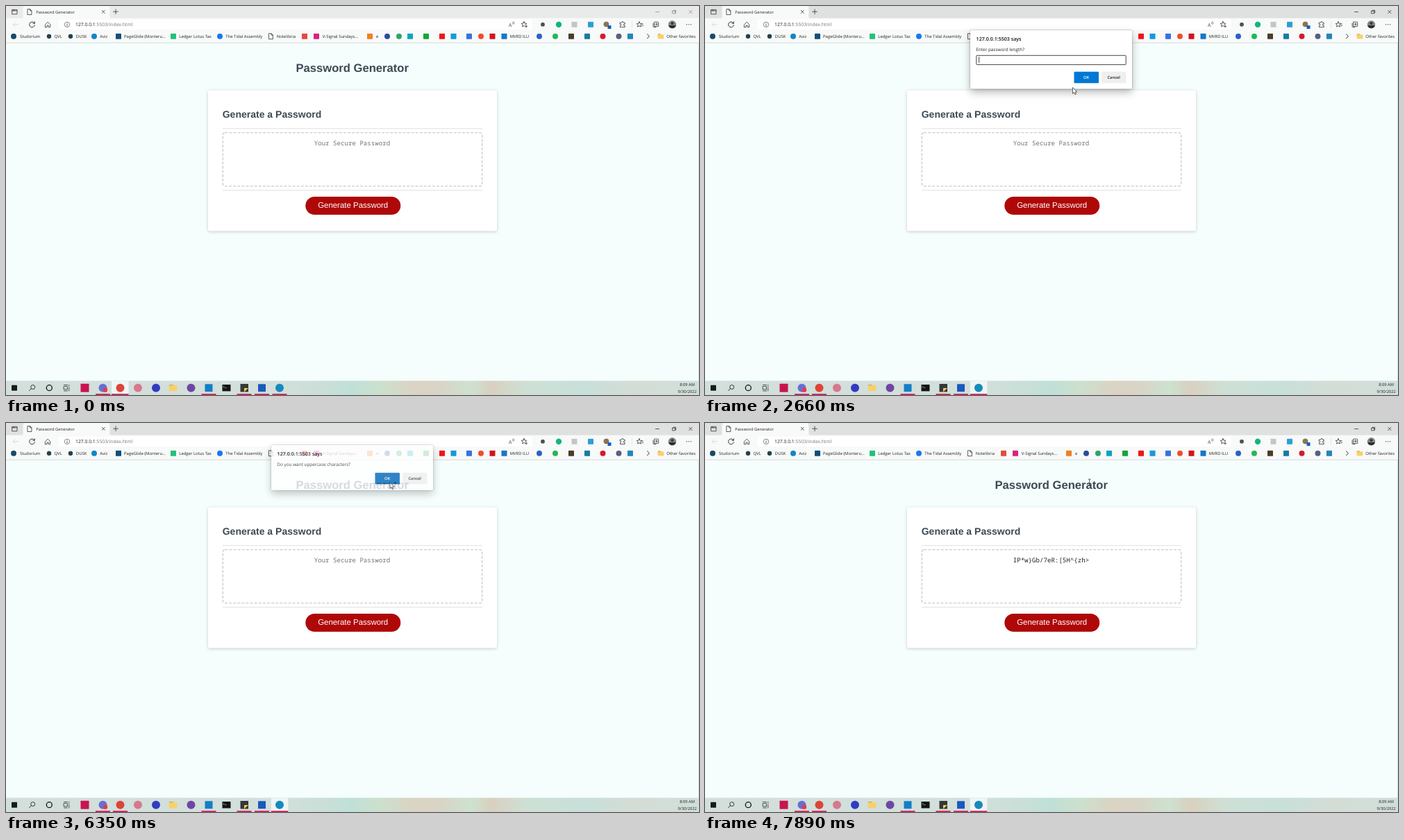
Write an HTML page that moves like this. It is 998 by 561 pixels and loops after 8 s.

```html
<!DOCTYPE html>
<html lang="en">
<head>
<meta charset="utf-8">
<title>Password Generator</title>
<style>
html, body { margin: 0; width: 100%; height: 100%; overflow: hidden; }
svg { display: block; width: 998px; height: 561px; }
text { font-family: "Open Sans", "Noto Sans", sans-serif; text-rendering: geometricPrecision; white-space: pre; }
.page { font-family: "Liberation Sans", Arial, sans-serif; }
.mono { font-family: "Noto Sans Mono", "DejaVu Sans Mono", monospace; }
.line { fill: none; stroke: #333; stroke-width: .8; stroke-linecap: round; stroke-linejoin: round; }
.card { filter: drop-shadow(0 1px 2px rgba(0,0,0,.2)); }
.panel { filter: drop-shadow(0 0 1px rgba(0,0,0,.35)) drop-shadow(0 5px 6px rgba(0,0,0,.27)); }
</style>
</head>
<body>
<svg id="stage" viewBox="0 0 998 561" xmlns="http://www.w3.org/2000/svg"></svg>
<script>
const LOOP = 8000;
const INK = '#3b4a54', BLUE = '#0078d4', DARK_BLUE = '#0067b8';
const stage = document.getElementById('stage');

// Markup helpers
const rect = (x, y, w, h, fill, r = 0, more = '') =>
  `<rect x="${x}" y="${y}" width="${w}" height="${h}" rx="${r}" fill="${fill}" ${more}/>`;
const disc = (x, y, r, fill, more = '') => `<circle cx="${x}" cy="${y}" r="${r}" fill="${fill}" ${more}/>`;
const box = (x, y, s, fill) => rect(x - s / 2, y - s / 2, s, s, fill, .6);
const line = (d, more = '') => `<path class="line" d="${d}" ${more}/>`;
const text = (x, y, size, str, more = '', fill = '#222') =>
  `<text x="${x}" y="${y}" font-size="${size}" fill="${fill}" ${more}>${str}</text>`;
const mid = 'text-anchor="middle"';
const sheet = (x, y) => line(`M${x - 2.7} ${y - 4}h3.4l2.2 2.2v5.8h-5.6zM${x + .6} ${y - 4}v2.3h2.3`);
const folder = (x, y, w, h) =>
  rect(x - w / 2, y - h / 2, w * .5, h * .6, '#d99e1f', .7) +
  rect(x - w / 2, y - h / 2 + 1, w, h - 1, '#f9d066', .7);
const star = (x, y) => {
  let d = '';
  for (let i = 0; i < 10; i++) {
    const a = i * Math.PI / 5 - Math.PI / 2, r = i % 2 ? 1.9 : 4.1;
    d += `${i ? 'L' : 'M'}${(x + r * Math.cos(a)).toFixed(2)} ${(y + r * Math.sin(a)).toFixed(2)}`;
  }
  return line(d + 'z');
};

function tabStrip() {
  return rect(0, 0, 998, 18, '#e9ebeb', 0, 'id="strip"') +
    `<path d="M23 18q1.5 0 1.5-2V2q0-2 2-2h121q2 0 2 2v14q0 2 1.5 2z" fill="#f8f9f9"/>` +
    line('M9 5.3h7v6.4h-7zM9 6.9h7M11 5.3v1.6', 'stroke-width="1"') +
    sheet(34, 8.5) + text(43.3, 10.6, 5.85, 'Password Generator') +
    line('M138.3 6.3l4 4m0-4l-4 4M158 4.8v6.8M154.6 8.2h6.8') +
    `<g id="controls">${line('M935.5 8.5h5M960 7.2h3.6v3.6h-3.6zM961 7.2v-1h3.7v3.7h-1M983.7 6.2l4.4 4.4m0-4.4l-4.4 4.4')}</g>`;
}

function toolbar() {
  return rect(0, 17.5, 998, 36, '#f8f9f9') + rect(76, 19.5, 682, 14.5, '#fff', 2.5) +
    line('M17.5 26.7h-7.5m3.2-3.2l-3.2 3.2 3.2 3.2', 'style="stroke:#d2d4d4"') +
    line('M41 24.9a3.9 3.9 0 1 0 .4 2.7M41.3 22.7v2.4h-2.4', 'style="stroke-width:1"') +
    line('M56.7 26.5l3.5-3.3 3.5 3.3v4.1h-2.4v-2.6h-2.2v2.6h-2.4z') +
    disc(88, 26.8, 3.7, 'none', 'stroke="#555" stroke-width=".7"') + line('M88 26.5v2.2M88 24.9v.1') +
    text(100, 29.2, 6.8, '127.0.0.1<tspan fill="#777">:5503/index.html</tspan>') +
    text(724, 29.7, 7, 'A', '', '#444') + line('M729.5 23.4q1.2 1 0 2.2M731 22.5q2 2 0 4', 'style="stroke-width:.6"') +
    star(746, 26.5) + disc(749, 29.3, 2.4, '#fff') + line('M747.3 29.3h3.4M749 27.6v3.4') +
    disc(773, 26.7, 2.9, '#4b5058') + disc(796, 26.7, 4.2, '#13b57d') +
    box(818.5, 26.7, 8, '#c4c5c6') + box(842, 26.7, 8, '#2b9fd2') +
    disc(864.5, 26.3, 3.9, '#8b7354') + box(869, 30.5, 5, '#1260c4') +
    line('M884.5 24h2.2q.3-2 1.5-1.6t1 1.6h2v2.2q-2-.2-2 1t2 1v2.2h-6.7v-2.2q1.6 0 1.6-1.1t-1.6-1z') +
    line('M901.5 22v9', 'style="stroke:#ddd"') +
    star(912, 26.7) + line('M915.5 26h2M916 28.5h1.5') +
    line('M932 25v4.5q0 1 1 1h3M934 23h4.7q1 0 1 1v5.3h-5.7zM936.8 24.6v3.2M935.2 26.2h3.2') +
    disc(959.5, 26.7, 5.7, '#85847e') + `<path d="M954.2 28a5.5 5.5 0 0 0 10.6 0z" fill="#292d2d"/>` +
    disc(959.5, 25, 2, '#373634') +
    [980.5, 983.5, 986.5].map(x => disc(x, 26.7, .65, '#333')).join('');
}

function bookmarks() {
  const labels = [[20, 'Studorium'], [69.5, 'QVL'], [100.8, 'DUSK'], [135.3, 'Aviz'],
    [170, 'PageGlide (Monteru...'], [249.3, 'Ledger Lotus Tax'], [316.3, 'The Tidal Assembly'],
    [389.7, 'Notelibria'], [455.7, 'V-Signal Sundays...'], [533, 'e'], [725.7, 'MVRD ILU'],
    [951.3, 'Other favorites']];
  const round = [[11, '#174a67'], [62, '#24404d'], [93, '#24404d'], [127, '#1385c5'], [308, '#1877f2'],
    [549, '#294c9c'], [566, '#2ba56b'], [684, '#ee4d2d'], [768, '#2862c7'], [791, '#20b957'],
    [859.5, '#d7192d'], [882.5, '#576080']];
  const square = [[162, '#124e7b'], [241, '#22c17c'], [430, '#e24a3d'], [447, '#d8237b'], [524, '#ef8020'],
    [582, '#08a5c2'], [605, '#12a737'], [628, '#ef1515'], [644.5, '#139bd7'], [667, '#3572df'],
    [700.5, '#d3121d'], [717.5, '#1478c9'], [814, '#4b3c25'], [837, '#147da0'], [899, '#2087b8']];
  return round.map(([x, c]) => disc(x, 43.7, x === 62 || x === 93 ? 3.2 : 4, c)).join('') +
    square.map(([x, c]) => box(x, 43.7, 8, c)).join('') +
    sheet(381.5, 43.7) + folder(943, 43.7, 8.5, 7) +
    line('M923.5 40.7l3 3-3 3', 'style="stroke-width:1"') +
    labels.map(([x, s]) => text(x, 46, 5.95, s)).join('') +
    rect(0, 52.7, 998, .8, '#cdd3d3');
}

function page() {
  return rect(0, 53.3, 998, 488, '#f5fdfd') + rect(997, 53.3, 1, 488, '#d9dede') +
    text(498.7, 95.2, 16.64, 'Password Generator', `class="page" font-weight="700" ${mid}`, INK) +
    `<g class="card">${rect(291, 121.5, 416, 203, '#fff', 2.7)}</g>` +
    text(311.7, 160.7, 14.03, 'Generate a Password', 'class="page" font-weight="700"', INK) +
    rect(312, 176.3, 374, .9, '#dadcdc') + rect(312, 265.4, 374, .9, '#dadcdc') +
    rect(312.3, 182.7, 373.4, 77, '#fff', 3, 'stroke="#c0c0c0" stroke-width="1.1" stroke-dasharray="4 2.1"') +
    text(443.7, 200.7, 9.14, '', 'id="result" class="mono"') +
    rect(431.3, 275, 137, 26, '#af0808', 13) +
    text(499.7, 291.3, 11.44, 'Generate Password', `class="page" ${mid}`, '#fff');
}

function taskbar() {
  const tones = [[0, '#d2dfda'], [40, '#d2dfda'], [46, '#c9dfd7'], [50, '#bfe0d7'], [54, '#cce0cd'],
    [59, '#dbd3c3'], [63, '#d8d5c7'], [67, '#cde2cf'], [70, '#d9d0c0'], [75, '#cee0d4'],
    [83, '#c8e0da'], [91, '#d4ddd5'], [100, '#d0dfda']];
  const tiles = [[12, 8, '#141b1f'], [113.5, 12, '#c9134f'], [292, 11, '#147dc7'], [368.5, 11, '#185abd']];
  const discs = [[139.5, '#6570d6'], [164.5, '#dc4437'], [190, '#d9778d'], [216, '#303bc4'],
    [266.5, '#6f45a5'], [394, '#168abd']];
  return `<defs><linearGradient id="sky">${tones.map(([p, c]) =>
      `<stop offset="${p}%" stop-color="${c}"/>`).join('')}</linearGradient></defs>` +
    rect(0, 540.5, 998, 20.5, 'url(#sky)') +
    rect(152, 540.5, 24.5, 20.5, '#eff5f3', 0, 'id="focus"') +
    tiles.map(([x, s, c]) => box(x, 550.7, s, c)).join('') +
    discs.map(([x, c]) => disc(x, 550.7, 6, c)).join('') +
    disc(143, 553.8, 3.2, '#e53b45') +
    disc(38.7, 549.6, 3, 'none', 'stroke="#222" stroke-width=".9"') +
    line('M36.5 551.8l-3 3', 'style="stroke-width:1"') +
    disc(62.3, 550.7, 4, 'none', 'stroke="#111" stroke-width="1.3"') +
    line('M83.5 548.6h5v4.3h-5zM83.5 546.5h5M83.5 555h5M90.8 546.5v1.5M90.8 550v5') +
    folder(240.7, 550.7, 11.5, 9) +
    rect(311.5, 546, 12, 9.5, '#101415') +
    line('M313 548.3l1.3 1-1.3 1M315.2 550.7h2', 'style="stroke:#ddd;stroke-width:.6"') +
    rect(337.5, 545, 11.5, 11.5, '#34383a') + `<path d="M343 556.5v-5.5h6z" fill="#f6cf34"/>` +
    [129, 281.5, 332.5, 358].map(x => rect(x, 559.3, 21, 1.7, '#d0165b')).join('') +
    rect(0, 559.3, 24.5, 1.7, '#d0165b', 0, 'id="leftBar"') +
    rect(0, 559.3, 24.5, 1.7, '#d0165b', 0, 'id="rightBar"') +
    text(981, 548.2, 5.75, '8:09 AM', mid) + text(981.2, 557.5, 5.75, '9/30/2022', mid);
}

function dialog(id) {
  const button = (x, cls, label, fill, ink) => rect(x, 94.8, 35.5, 16.4, fill, 1, `class="${cls}"`) +
    text(x + 17.7, 105, 5.8, label, `font-weight="600" ${mid}`, ink);
  return `<g id="${id}">
    <g class="panel">${rect(382, 35, 233, 84.6, '#fff', 1.5, 'class="sheet"')}</g>
    ${text(390.6, 50.3, 7.1, '127.0.0.1:5503 says', 'font-weight="600"', '#111')}
    ${text(390.3, 65, 6.4, '', 'class="ask"')}
    <g class="field">${rect(390.8, 71.3, 215.4, 13.3, '#fff', .8, 'stroke="#333" stroke-width=".9"')}
      ${text(394.3, 80.4, 6.5, '', 'class="typed"')}
      ${rect(394.3, 73.3, .8, 8.5, '#111', 0, 'class="caret"')}</g>
    <g class="buttons">${button(531.5, 'ok', 'OK', BLUE, '#fff')}${button(571, 'no', 'Cancel', '#efefef', '#222')}</g>
  </g>`;
}

const pointers = `<g id="pointer">
  <path id="arrow" d="M0 0v8.8l2-1.8 1.4 3.2 1.5-.7-1.4-3.1h2.7z" fill="#fff" stroke="#222" stroke-width=".7"/>
  <path id="hand" d="M-.9 .6q.9-1.2 1.8 0v3.6l3 .7q1 .4 .9 1.5l-.7 4.6h-4.3l-2.5-4q-.3-1.3 1.8-.1z" fill="#fff" stroke="#222" stroke-width=".7"/>
  <path id="beam" class="line" d="M-1.6 -4.7q1.6 0 1.6 1v7.4q0 1-1.6 1M1.6 -4.7q-1.6 0-1.6 1M0 3.7q0 1 1.6 1"/>
</g>`;

stage.innerHTML = tabStrip() + toolbar() + page() + bookmarks() + taskbar() +
  dialog('back') + dialog('front') + pointers;

const $ = id => document.getElementById(id);
const set = (el, attrs) => { for (const k in attrs) el.setAttribute(k, attrs[k]); };
const show = (el, on) => el.setAttribute('visibility', on ? 'inherit' : 'hidden');

const questions = ['Enter password length?', 'Do you want lowercase characters?',
  'Do you want uppercase characters?', 'Include numbers?', 'Include special characters?'];

// Start in ms, then visible layers as [question, vertical shift, opacity]
const scenes = [
  [0], [1630, [0, -6, .3]], [1700, [0, -3.5, .75]], [1780, [0, -1, 1]], [1860, [0, 0, 1]],
  [5240, [1, 0, 1]],
  [5580, [1, -7, .12], [2, -2, 1]], [5700, [2, 0, 1]],
  [6310, [2, -3, .8]], [6360, [2, -6.5, .35], [3, -3.5, .75]], [6410, [3, -1.5, 1]], [6460, [3, 0, 1]],
  [6950, [3, -3, .85]], [7020, [3, -6.5, .35], [4, -3.5, .78]], [7080, [4, -1.5, 1]], [7120, [4, 0, 1]],
  [7650, [4, -2, .8]], [7710, [4, -5, .4]], [7770, [4, -7, .1]], [7830]
];

// Pointer path as [ms, x, y]
const path = [
  [780, -10, 330], [1000, 180, 328], [1250, 400, 305], [1470, 461.5, 290.5], [2030, 461.5, 290.5],
  [2200, 500, 205], [2350, 572, 132], [2500, 529.5, 117.5], [4140, 529.5, 117.5], [4250, 557, 105.5],
  [5239, 557, 105.5], [5240, 553, 85.5]
];

const within = (t, a, b) => t >= a && t < b;

function pointerAt(t) {
  const i = path.findIndex(p => p[0] > t);
  if (i < 0) return path[path.length - 1].slice(1);
  if (i === 0) return path[0].slice(1);
  const [t0, x0, y0] = path[i - 1], [t1, x1, y1] = path[i];
  const k = (t - t0) / (t1 - t0);
  return [x0 + (x1 - x0) * k, y0 + (y1 - y0) * k];
}

function drawDialog(el, layer, t) {
  show(el, layer);
  if (!layer) return;
  const [n, dy, alpha] = layer, prompt = n === 0;
  const find = name => el.querySelector('.' + name);
  set(el, { transform: `translate(0 ${dy})`, opacity: alpha });
  set(find('sheet'), { height: prompt ? 84.6 : 65 });
  set(find('buttons'), { transform: `translate(0 ${prompt ? 0 : -20})` });
  find('ask').textContent = questions[n];
  show(find('field'), prompt);
  const typed = t >= 3240;
  find('typed').textContent = typed ? '20' : '';
  set(find('caret'), { x: typed ? 401.4 : 394.3 });
  const caretOn = t < 2130 || within(t, 2660, 3780) || t >= 4540;
  show(find('caret'), prompt && caretOn);
  const hover = within(t, 4540, 5240) || within(t, 6170, 6360) || within(t, 6810, 7020) || within(t, 7600, 7830);
  set(find('ok'), { fill: hover ? DARK_BLUE : BLUE });
}

function draw(t) {
  const active = t >= 1500, moved = t >= 1700;
  set($('strip'), { fill: active ? '#dfe1e1' : '#e9ebeb' });
  set($('controls'), { opacity: active ? 1 : .5 });
  set($('focus'), { x: moved ? 381.8 : 152 });
  set($('leftBar'), { x: moved ? 154 : 152, width: moved ? 21 : 24.5 });
  set($('rightBar'), { x: moved ? 381.8 : 383.5, width: moved ? 24.5 : 21 });

  const done = t >= 7650;
  $('result').textContent = done ? 'IP*w}Gb/7eR:[5H^{zh>' : 'Your Secure Password';
  set($('result'), { fill: done ? '#222' : '#757575' });

  const layers = scenes.filter(s => s[0] <= t).pop().slice(1);
  drawDialog($('front'), layers[layers.length - 1], t);
  drawDialog($('back'), layers.length > 1 ? layers[0] : null, t);

  const [x, y] = pointerAt(t), beam = t >= 7830, hand = within(t, 1400, 2030);
  set($('pointer'), { transform: `translate(${x + (beam ? .7 : 0)} ${y})` });
  show($('arrow'), t >= 780 && !hand && !beam);
  show($('hand'), hand);
  show($('beam'), beam);
}

const start = performance.now();
function tick() {
  draw((performance.now() - start) % LOOP);
  requestAnimationFrame(tick);
}
tick();
</script>
</body>
</html>
```
